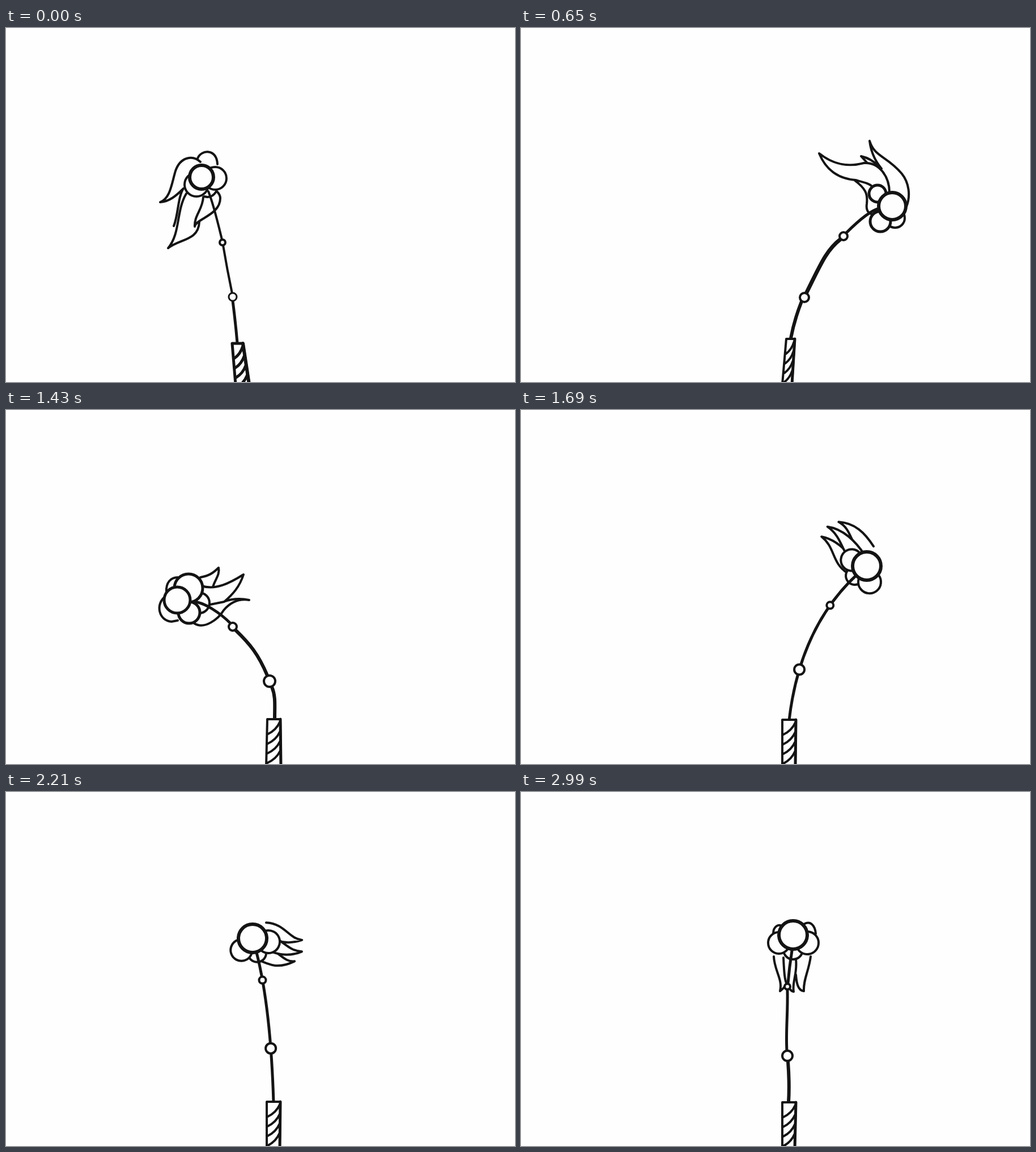
Write an HTML page that moves like this. It is 898 by 624 pixels and loops after 3380 ms.

```html
<!DOCTYPE html>
<html lang="en">
<head>
<meta charset="utf-8">
<title>Swinging flower</title>
<style>
  html, body { margin: 0; width: 100%; height: 100%; overflow: hidden; background: #fefefe; }
  svg { display: block; width: 898px; height: 624px; }
  svg * { stroke: #141414; stroke-linecap: round; stroke-linejoin: round; }
</style>
</head>
<body>
<svg id="stage" viewBox="0 0 898 624"></svg>
<script>
const STEP = 130, LOOP = 3380, PAPER = '#fefefe';
const stage = document.getElementById('stage');

const path = (d, w = 4, fill = 'none') => `<path d="${d}" stroke-width="${w}" fill="${fill}"/>`;
const ring = ([x, y, r, w = 4]) => `<circle cx="${x}" cy="${y}" r="${r}" stroke-width="${w}" fill="${PAPER}"/>`;
const rings = list => list.map(ring).join('');

// Striped grip, given by its top and bottom edges
function grip([tl, tr, top, bl, br], w = 4) {
  const bottom = 628;
  const at = (a, b, y) => a + (b - a) * (y - top) / (bottom - top);
  let out = path(`M${tl} ${top} L${tr} ${top} L${br} ${bottom} L${bl} ${bottom} Z`, w, PAPER)
    + path(`M${tr} ${top} L${br} ${bottom}`, w + 1);
  for (let i = 0; i < 4; i++) {
    const y = top + 26 + i * 17;
    const l = at(tl, bl, y) + 2, r = at(tr, br, y - 21) - 1;
    out += path(`M${l} ${y} Q${l + (r - l) * .7} ${y - 7} ${r} ${y - 21}`, w);
  }
  return out;
}

// The last of balls is the front one and covers the stem
function drawn(p) {
  return path(p.leaves, p.leafW || 4) + rings(p.balls.slice(0, -1))
    + p.stem.map(([d, w]) => path(d, w)).join('')
    + ring(p.balls[p.balls.length - 1]) + rings(p.beads) + grip(p.grip, p.gripW);
}

const leaf = (o, len) => path(
  `M16 ${o - 11} C48 ${o - 18} 62 ${o + 6} ${len} ${o * .9} C${len - 22} ${o + 17} 44 ${o + 17} 16 ${o + 11}`, 4, PAPER);

// Posed flower: head place, leaf direction in degrees, stem foot, leaf length
function posed([x, y, dir, foot = 473, len = 98]) {
  const base = 547;
  const cx = foot + (x - foot) * .15, cy = base + (y - base) * .65;
  const at = t => [(1 - t) ** 2 * foot + 2 * t * (1 - t) * cx + t * t * x,
                   (1 - t) ** 2 * base + 2 * t * (1 - t) * cy + t * t * y];
  const lean = Math.atan2(x - cx, cy - y) * 180 / Math.PI;
  return `<g transform="translate(${x} ${y}) rotate(${dir})">${leaf(-22, len - 5)}${leaf(22, len - 8)}${leaf(0, len)}</g>`
    + `<g transform="translate(${x} ${y}) rotate(${lean})">${rings([[0, 27, 16], [-25, 14, 19], [25, 14, 20]])}</g>`
    + path(`M${foot} ${base} Q${cx} ${cy} ${x} ${y}`, 5)
    + ring([x, y, 25, 6]) + ring([...at(.27), 9]) + ring([...at(.68), 6])
    + grip([foot - 12, foot + 12, 546, foot - 12, foot + 11]);
}

const REST_GRIP = [461, 485, 547, 461, 483];
const REST_BALLS = [[480, 278, 17], [455, 266, 19], [505, 266, 20], [480, 252, 25, 6]];

const pulled = {
  leaves: `M338 230 C344 214 372 212 373 240 M343 236 C330 224 308 226 299 252 C292 275 290 300 272 307 C288 306 300 296 313 283
    M313 283 C303 298 304 330 296 349 M318 292 C300 322 308 362 286 388 C305 372 340 375 341 342
    M348 298 C347 320 332 330 333 350 C335 336 378 330 378 300 C378 294 374 290 372 288 M350 297 Q363 301 371 288`,
  balls: [[336, 276, 21], [369, 265, 20], [345, 263, 21, 6]],
  stem: [['M357 288 C366 310 373 340 381 373', 4], ['M383 383 Q390 425 399 468', 4], ['M400 481 Q405 520 408 555', 5]],
  beads: [[382, 378, 5], [400, 474, 7, 3]],
  grip: [399, 418, 556, 405, 429], gripW: 5
};

const diving = {
  leaves: `M650 290 C650 262 632 236 605 238 C575 246 550 240 526 221 C540 255 565 266 590 268 C605 272 615 274 620 280
    M630 243 Q618 230 600 226 L611 238 M680 315 C688 295 684 272 672 257 C645 225 624 228 615 199 C618 225 630 240 636 248
    M588 268 C608 283 612 292 610 310 C608 324 616 330 624 328`,
  balls: [[660, 335, 17], [629, 292, 15, 5], [634, 341, 18, 5], [655, 314, 24, 6]],
  stem: [['M632 318 C615 322 590 345 574 361', 5], ['M564 372 C538 392 528 418 503 468', 7], ['M495 482 Q482 515 476 547', 6]],
  beads: [[569, 367, 7], [500, 475, 8]],
  grip: [468, 483, 548, 461, 478]
};

const low = {
  leaves: `M686 365 C685 340 665 335 649 299 C665 305 690 318 700 345 M692 374 C706 350 697 320 693 305
    C703 303 705 318 712 327 C722 350 724 370 722 390 M648 436 C655 464 695 464 708 450 C722 430 718 405 733 385 C715 392 705 415 685 430`,
  balls: [[666, 370, 20], [661, 411, 26, 5], [669, 397, 29, 6]],
  stem: [['M640 382 Q620 385 603 396', 5], ['M591 403 C560 420 530 440 505 477', 5], ['M493 494 Q477 520 468 545', 5]],
  beads: [[597, 400, 6], [500, 485, 10, 5]],
  grip: [460, 482, 545, 457, 485]
};

const back = {
  leaves: `M282 328 C262 342 270 372 292 373 L303 371 M283 320 C282 305 290 295 303 295
    M343 295 C358 292 365 288 375 278 C378 290 368 300 365 312 M345 310 C370 318 395 305 419 290 C412 312 400 325 385 338 L360 343
    M332 376 C350 388 375 368 384 353 C395 340 410 332 429 335 C415 332 400 332 384 338`,
  balls: [[341, 340, 18], [323, 357, 19, 5], [322, 314, 25, 5], [302, 335, 23, 5]],
  stem: [['M330 338 C350 338 380 360 396 376', 5], ['M405 388 C430 412 445 430 461 468', 6], ['M469 488 C476 505 474 520 474 545', 6]],
  beads: [[400, 382, 7], [465, 478, 10]],
  grip: [461, 484, 545, 459, 485]
};

const upright = {
  leaves: `M513 240 C490 242 470 243 449 224 C455 250 470 275 495 271 L530 272 M506 240 Q514 232 523 234
    M586 260 C602 270 600 290 585 305 C560 320 530 312 515 300 C500 292 490 292 480 298
    C488 286 505 280 527 276 C500 275 482 290 446 275 C460 290 480 292 490 290 M446 275 Q462 279 478 273`,
  leafW: 5,
  balls: [[543, 280, 18], [531, 250, 21], [568, 277, 22], [560, 251, 26, 5]],
  stem: [['M541 278 C532 300 522 320 512 343', 5], ['M505 357 C490 385 486 420 480 455', 5], ['M476 477 Q475 515 475 545', 5]],
  beads: [[508, 350, 5.5], [479, 466, 10]],
  grip: [461, 484, 545, 461, 486]
};

const easing = {
  leaves: `M506 244 C525 236 530 260 535 275 C545 290 565 295 580 311 Q560 314 540 310
    M458 290 C470 325 500 330 510 327 C530 315 545 312 549 299 C530 305 515 300 495 290 M500 290 Q520 291 530 301
    M446 288 C440 310 455 310 464 310 Q457 302 458 290`,
  balls: REST_BALLS,
  stem: [['M483 280 C476 300 474 325 470 341', 5], ['M466 355 Q462 410 466 455', 6], ['M466 475 Q469 520 472 547', 5]],
  beads: [[468, 348, 6], [467, 465, 9]],
  grip: REST_GRIP
};

const still = {
  leaves: `M445 250 C445 236 455 232 462 237 M499 233 C510 226 519 235 520 250
    M446 290 C447 315 462 330 457 351 Q465 345 468 338 M463 292 C464 315 465 335 470 340 Q476 352 481 352 C478 335 488 320 485 295
    M511 290 C508 315 498 330 499 351 C488 350 486 335 485 322`,
  balls: REST_BALLS,
  stem: [['M478 280 C474 305 472 325 471 337', 5], ['M470 349 C471 390 467 420 469 456', 5], ['M471 475 Q474 515 472 547', 6]],
  beads: [[470, 343, 5], [470, 465, 9]],
  grip: REST_GRIP
};

const poses = [
  pulled, [305, 282, 125, 412], [292, 290, 140, 422], [355, 256, 165, 440], [520, 242, 190, 460],
  diving, [668, 342, -112], [672, 370, -98],
  low, [660, 380, -20], [560, 270, 15],
  back, [390, 270, 110], [610, 275, 225], [695, 325, -15],
  upright, [505, 250, 75, 473, 90], [435, 258, 15, 472, 90], [455, 255, 110, 472, 90],
  easing, [480, 252, 65, 472, 92], [480, 252, 105, 472], [480, 252, 84, 472],
  still
].map(p => Array.isArray(p) ? posed(p) : drawn(p));

const start = performance.now();
let shown = -1;
function tick() {
  const t = (performance.now() - start) % LOOP;
  const i = Math.min(poses.length - 1, Math.floor(t / STEP));
  if (i !== shown) stage.innerHTML = poses[shown = i];
  requestAnimationFrame(tick);
}
tick();
</script>
</body>
</html>
```
